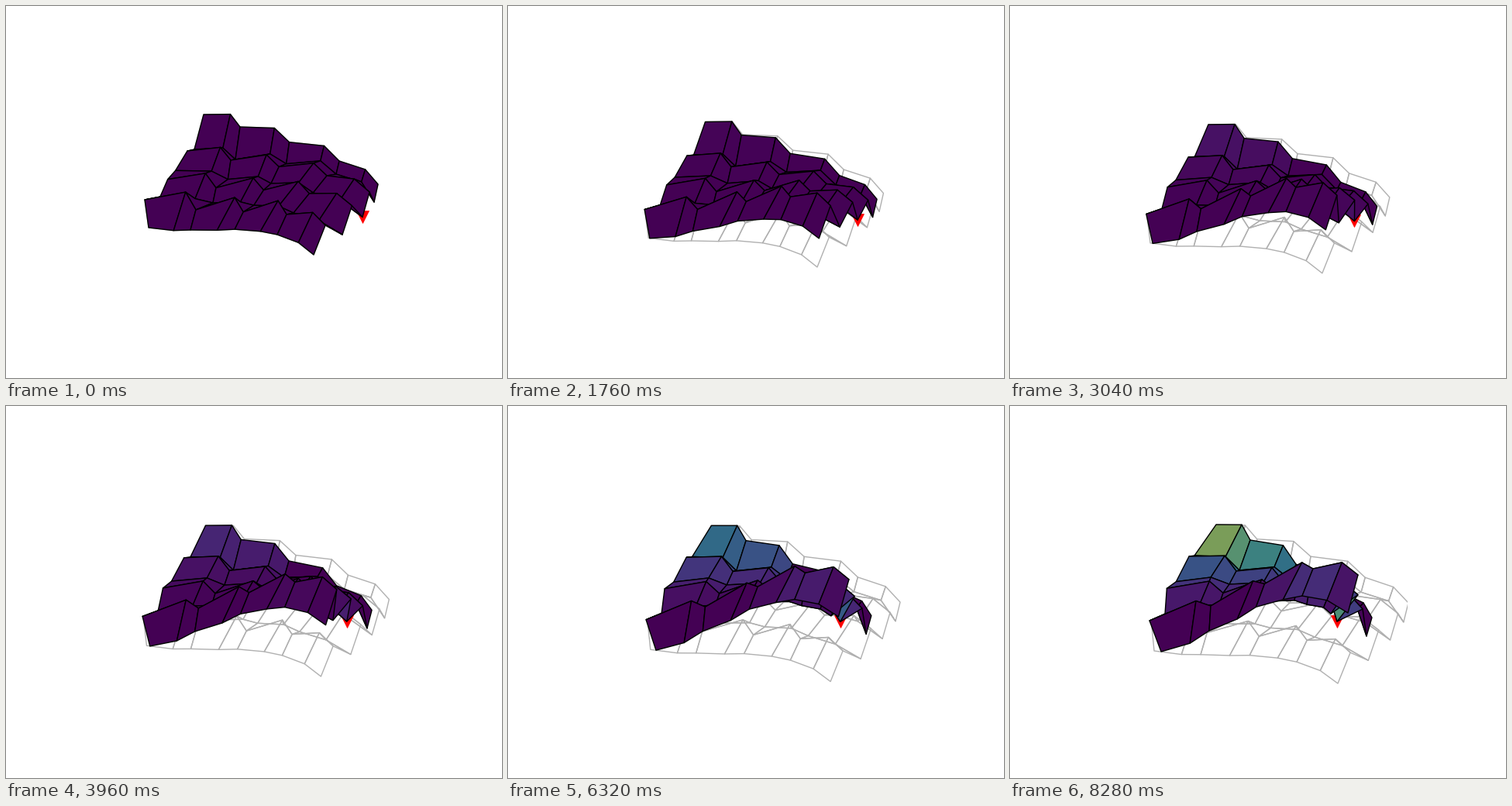
A matplotlib script for the animation above (8320 ms loop, 640x480 px).

```python
import numpy as np
import matplotlib.pyplot as plt
from matplotlib.animation import FuncAnimation
from matplotlib.collections import PolyCollection

W, H, DPI = 640, 480, 100
FRAMES, STEP = 208, 40
ROWS, COLS = 8, 9
LOAD_NODE = (4, 8)

u = np.linspace(0, 1, COLS)[None, :, None]
v = np.linspace(0, 1, ROWS)[:, None, None]
viridis = plt.get_cmap("viridis")


def weights(nodes, x):
    """Lagrange weights of the nodes at every x."""
    x = np.asarray(x, float)
    return np.array([np.prod([(x - m) / (n - m) for m in nodes if m != n], axis=0)
                     for n in nodes]).T


def surface(valleys, ridges):
    """Pleated sheet: valley rows 0, 2, 6 and ridge rows 1, 5, 7 guide it."""
    across = weights((0, 2, 6, 8), range(COLS))
    p = np.empty((ROWS, COLS, 2))
    for first, nodes, net in ((0, (0, 2, 6), valleys), (1, (1, 5, 7), ridges)):
        along = weights(nodes, range(first, ROWS, 2))
        p[first::2] = np.einsum("ra,cb,abk->rck", along, across, np.array(net))
    return p


def pleats():
    """Sideways kink of the odd columns, fading to the right."""
    k = np.empty((ROWS, COLS, 2))
    k[::2] = np.array((6, 1)) + v[::2] * np.array((8, -13))
    k[1::2] = np.array((20, -20)) + v[1::2] * np.array((-6, 12))
    return k * (1 - u ** 4) * (np.arange(COLS) % 2)[None, :, None]


def corners(fl, fr, bl, br):
    """Bilinear field from its front and back corner vectors."""
    fl, fr, bl, br = map(np.array, (fl, fr, bl, br))
    return (1 - v) * ((1 - u) * fl + u * fr) + v * ((1 - u) * bl + u * br)


FLAT = surface(
    [[(184, 286), (238, 289), (350, 295), (397, 321)],
     [(199, 246), (267, 254), (371, 267), (434, 295)],
     [(243, 185), (296, 198), (426, 217), (475, 253)]],
    [[(179, 250), (245, 263), (362, 269), (412, 283)],
     [(234, 187), (290, 199), (414, 219), (469, 240)],
     [(255, 140), (302, 156), (430, 200), (480, 230)]]) + pleats()

FOLDED = surface(
    [[(195, 317), (257, 290), (377, 245), (436, 267)],
     [(200, 268), (270, 256), (383, 256), (414, 268)],
     [(238, 193), (296, 212), (420, 246), (460, 297)]],
    [[(180, 277), (259, 258), (391, 210), (449, 218)],
     [(231, 194), (292, 213), (408, 240), (455, 262)],
     [(266, 153), (310, 173), (427, 240), (467, 273)]]) + pleats()

# Slow drift of the view, halfway and at the end
DRIFT_MID = corners((-3, 20), (6, 24), (1, 13), (10, 17))
DRIFT_END = corners((2, 30), (26, 37), (11, 13), (34, 24))
FOLD = FOLDED - FLAT - DRIFT_END


def through(mid, end, s):
    """Quadratic from 0 through mid at s = 0.5 to end at s = 1."""
    return 4 * s * (1 - s) * mid + s * (2 * s - 1) * end


PANELS = [(r, c) for r in range(ROWS - 2, -1, -1) for c in range(COLS - 1)]


def strain(r, c):
    def bump(r0, c0, width):
        return np.exp(-((r - r0) ** 2 + (c - c0) ** 2) / width ** 2)

    back = 0.02 * r ** 2 * (1 - c / 8) if c < 4 else 0
    return back + 0.6 * bump(3, 7, 1) + 0.17 * bump(0, 5.5, 1.5)


STRAIN = np.array([strain(r, c) for r, c in PANELS])


def quads(p):
    return [(p[r, c], p[r, c + 1], p[r + 1, c + 1], p[r + 1, c])
            for r, c in PANELS]


# Square drawing area, in stage pixels
SIDE = 0.77 * H
LEFT, TOP = 328 - SIDE / 2, 0.12 * H

fig = plt.figure(figsize=(W / DPI, H / DPI), dpi=DPI, facecolor="white")
ax = fig.add_axes([LEFT / W, 1 - (TOP + SIDE) / H, SIDE / W, SIDE / H])
ax.set_xlim(LEFT, LEFT + SIDE)
ax.set_ylim(TOP + SIDE, TOP)
ax.axis("off")

wire = PolyCollection([], facecolors="none", edgecolors="#b0b0b0",
                      linewidths=1, zorder=1)
sheet = PolyCollection([], edgecolors="black", linewidths=1, zorder=3)
ax.add_collection(wire, autolim=False)
ax.add_collection(sheet, autolim=False)
load, = ax.plot([], [], "v", color="red", ms=12, mew=0.5, zorder=2)


def draw(k):
    x = k / (FRAMES - 1)
    s = x * (1.55 - 0.55 * x)
    rest = FLAT + through(DRIFT_MID, DRIFT_END, s)
    # sideways motion starts late, lifting starts early
    pose = rest + FOLD * through(np.array((0.35, 0.62)), 1, s)
    level = STRAIN * s ** 3.6
    wire.set_verts(quads(rest))
    sheet.set_verts(quads(pose))
    sheet.set_facecolor((viridis(1.25 * level) + viridis(0.4 * level)) / 2)
    load.set_data(*pose[LOAD_NODE][:, None])
    return wire, load, sheet


anim = FuncAnimation(fig, draw, frames=FRAMES, interval=STEP,
                     repeat=True, repeat_delay=0)
plt.show()
```
